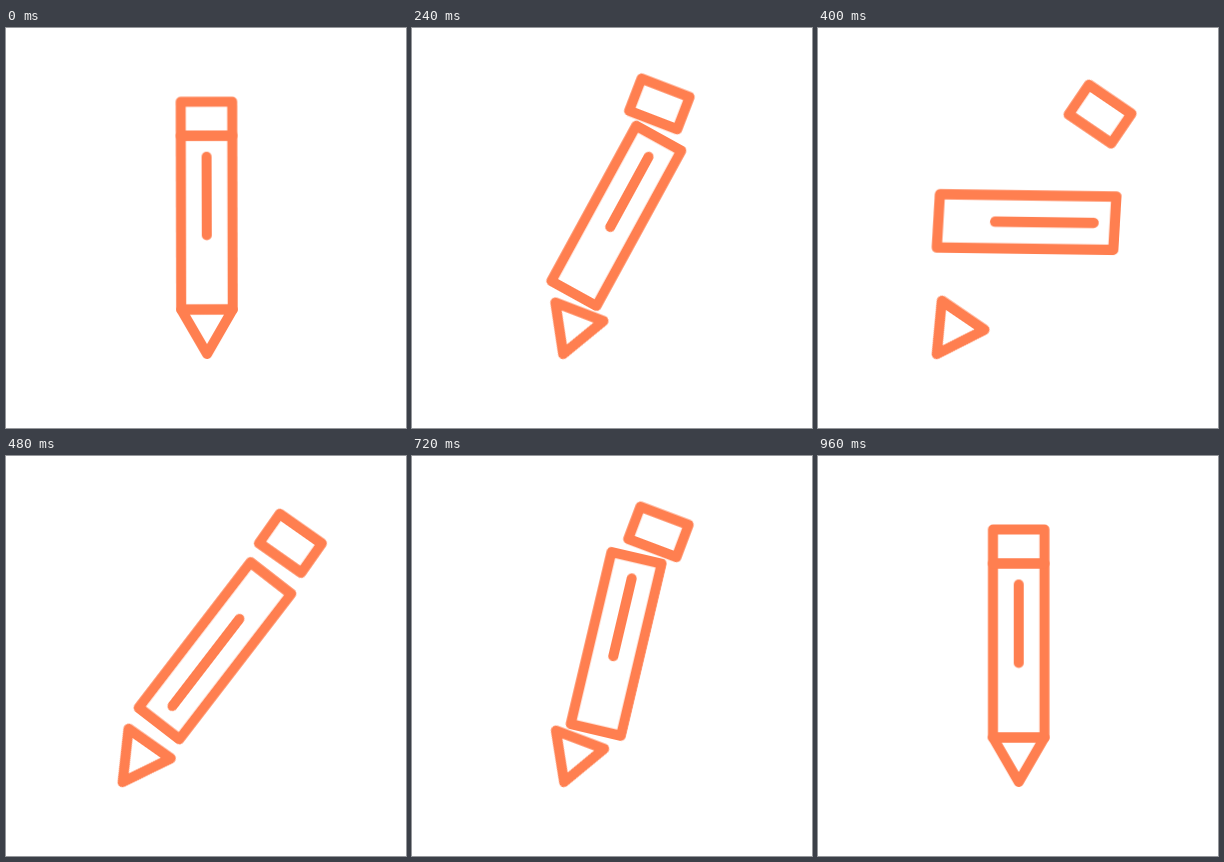
Recreate the animation shown at these times as an HTML page without scripts. Size 400 px wide and 400 px high, loop 1.04 s.

```html
<!DOCTYPE html>
<html lang="en">
<head>
<meta charset="utf-8">
<title>Pencil</title>
<style>
  html, body { margin: 0; width: 100%; height: 100%; overflow: hidden; background: #fff; }
  svg { display: block; width: 100%; height: 100%; }
  .pencil {
    fill: none;
    stroke: #ff7f50;
    stroke-width: 10;
    stroke-linecap: round;
    stroke-linejoin: round;
  }
  .pencil, .lift, .spin, .mark { animation: 1040ms linear infinite; }
  .pencil { animation-name: lean; }
  .body { animation-name: lift-body; }
  .eraser { animation-name: lift-eraser; }
  .spin { animation-name: spin; }
  .mark { animation-name: grow; }

  /* Crouch, leap, hang, then the same way back. */
  @keyframes lean {
    0% { transform: translateX(0) rotate(0deg) scaleY(1); animation-timing-function: cubic-bezier(.2, .6, .5, 1); }
    15.385% { transform: translateX(21px) rotate(-7.7deg) scaleY(.944); animation-timing-function: cubic-bezier(.15, .8, .5, 1); }
    46.154% { transform: translateX(-84px) rotate(35.1deg) scaleY(1.053); animation-timing-function: cubic-bezier(.5, 0, .85, .2); }
    76.923% { transform: translateX(21px) rotate(-7.7deg) scaleY(.944); animation-timing-function: cubic-bezier(.5, 0, .8, .4); }
    92.308%, 100% { transform: translateX(0) rotate(0deg) scaleY(1); }
  }
  @keyframes lift-body {
    0%, 15.385% { transform: translateY(0); animation-timing-function: cubic-bezier(.15, .8, .5, 1); }
    46.154% { transform: translateY(-20.8px); animation-timing-function: cubic-bezier(.5, 0, .85, .2); }
    76.923%, 100% { transform: translateY(0); }
  }
  @keyframes lift-eraser {
    0%, 15.385% { transform: translateY(0); animation-timing-function: cubic-bezier(.15, .8, .5, 1); }
    46.154% { transform: translateY(-41.5px); animation-timing-function: cubic-bezier(.5, 0, .85, .2); }
    76.923%, 100% { transform: translateY(0); }
  }
  /* One full turn, fastest in the middle. */
  @keyframes spin {
    0%, 15.385% { transform: rotate(0deg); animation-timing-function: cubic-bezier(.33, .15, .67, .55); }
    23.077% { transform: rotate(7.6deg); animation-timing-function: cubic-bezier(.4, .17, .7, .2); }
    38.462% { transform: rotate(57deg); animation-timing-function: cubic-bezier(.33, .18, .67, .44); }
    46.154% { transform: rotate(180deg); animation-timing-function: cubic-bezier(.33, .56, .67, .82); }
    53.846% { transform: rotate(303deg); animation-timing-function: cubic-bezier(.3, .8, .6, .83); }
    69.231% { transform: rotate(352.4deg); animation-timing-function: cubic-bezier(.33, .45, .67, .85); }
    76.923%, 100% { transform: rotate(360deg); }
  }
  @keyframes grow {
    0%, 23.077% { stroke-dasharray: 78.5px 200px; animation-timing-function: ease-in; }
    38.462% { stroke-dasharray: 97px 200px; animation-timing-function: ease-out; }
    46.154% { stroke-dasharray: 104px 200px; animation-timing-function: ease-in; }
    53.846% { stroke-dasharray: 97px 200px; animation-timing-function: ease-out; }
    69.231%, 100% { stroke-dasharray: 78.5px 200px; }
  }
</style>
</head>
<body>
<svg viewBox="0 0 400 400">
  <!-- Origin at the pencil point -->
  <g transform="translate(200.7 326)">
    <g class="pencil">
      <path d="M-25.75-44.5H25.75L0 0Z"/>
      <g class="lift body">
        <g transform="translate(0 -131.5)">
          <g class="spin">
            <rect x="-25.75" y="-87" width="51.5" height="174"/>
            <path class="mark" d="M0-66V46"/>
          </g>
        </g>
      </g>
      <rect class="lift eraser" x="-25.75" y="-252.5" width="51.5" height="34"/>
    </g>
  </g>
</svg>
</body>
</html>
```
